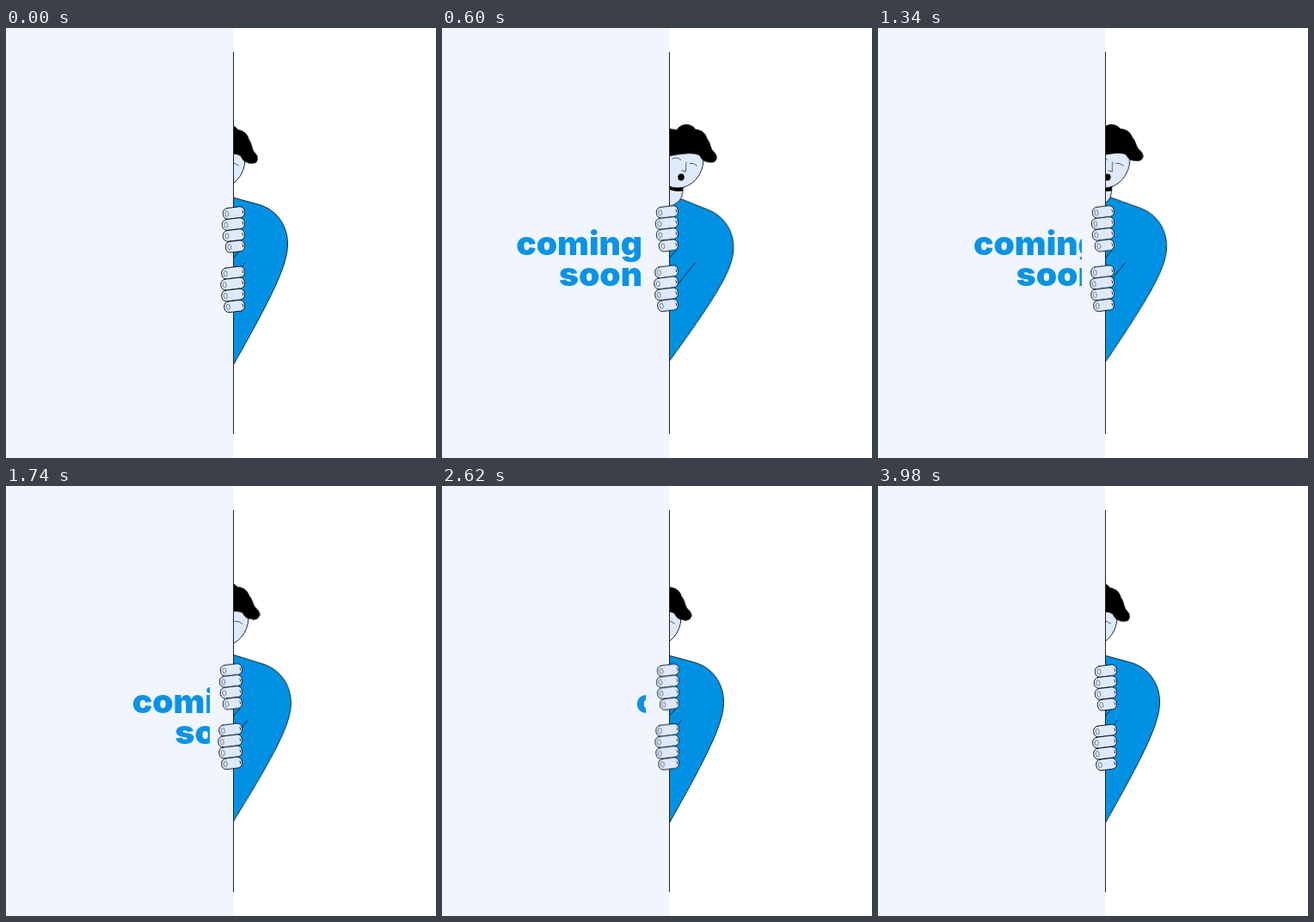
An HTML page that plays this animation: 500x500 px, repeating every 4000 ms.

```html
<!DOCTYPE html>
<html lang="en">
<head>
<meta charset="utf-8">
<title>Coming soon</title>
<style>
  html, body { margin: 0; width: 100%; height: 100%; overflow: hidden; background: #fff; }
  svg { display: block; width: 100vw; height: 100vh; }
  text { font: 900 39px Inter, "Open Sans", sans-serif; text-anchor: end; fill: #0a93e6; }
  .line, .skin, .shirt { stroke: #0b1016; stroke-width: .9; stroke-linecap: round; }
  .line { fill: none; }
  .fine { stroke-width: .65; }
  .skin { fill: #deeafc; }
  .shirt { fill: #0091e4; }
  .nail { fill: none; stroke: #4d586b; stroke-width: .7; }

  .torso, .peek, .hair, .hands, .words {
    animation: 4s cubic-bezier(.37, 0, .63, 1) infinite;
  }
  .torso { animation-name: lean; transform-origin: 245px 352px; }
  .peek { animation-name: peek; }
  .hair { animation-name: flop; transform-origin: 258px 134px; }
  .hands { animation-name: grip; }
  .words { animation-name: slide; }

  @keyframes lean {
    0%, 60%, 100% { transform: rotate(0deg); }
    17% { transform: rotate(6.8deg); }
  }
  /* --far is how far each part comes out from behind the wall */
  @keyframes peek {
    0% { transform: translateX(0); animation-timing-function: cubic-bezier(.3, 0, .4, 1); }
    17.25% { transform: translateX(var(--far)); }
    52.5%, 100% { transform: translateX(0); }
  }
  @keyframes flop {
    0%, 8%, 100% { transform: translateX(0) rotate(6deg); }
    24% { transform: translateX(0) rotate(0deg); }
    55% { transform: translateX(-4.5px) rotate(1.5deg); }
    80% { transform: translateX(-2px) rotate(6deg); }
  }
  @keyframes grip {
    0%, 81%, 100% { transform: translate(0, 0); }
    14%, 54% { transform: translate(-3px, -1.2px); }
  }
  @keyframes slide {
    0%, 5% { transform: translateX(152px); animation-timing-function: cubic-bezier(.5, 0, .2, 1); }
    16.75% { transform: translateX(-6px); }
    78.5%, 100% { transform: translateX(152px); }
  }
</style>
</head>
<body>
<svg viewBox="0 0 500 500">
  <defs>
    <clipPath id="open"><rect x="264.5" width="236" height="500"/></clipPath>
    <clipPath id="slot"><rect width="237" height="500"/></clipPath>
  </defs>
  <rect width="264.5" height="500" fill="#f0f5ff"/>

  <g clip-path="url(#open)">
    <path class="torso shirt" d="M236 189.500L293 205C314 210.500 327.500 229 327.500 251C327.500 274 313 306 264 392.500L236 442Z"/>
    <path class="line" d="M262 270L272 259"/>
    <path class="line peek" style="--far: 16.5px" d="M258 298L278 273"/>
    <g class="peek" style="--far: 19.8px">
      <path class="skin" d="M222 180L261 182Q261 191 259 197Q255 204 246 207.500L222 214Z"/>
      <path d="M222 180H261L260.500 189.500Q251 191 244 187.500L222 186Z"/>
    </g>
    <g class="peek" style="--far: 26.4px">
      <ellipse class="skin" cx="248" cy="153" rx="30" ry="33"/>
      <path class="line fine" d="M242 152Q247 149 252 153.500M262 157.500Q266 156 270.500 160M258 156Q257.500 162 257.500 167L253 165.800"/>
      <ellipse cx="252" cy="173.500" rx="3.700" ry="4"/>
      <path class="hair" d="M236 118L246 119C251 110 262 110 268 117C276 117 281 123 282 127C287 132 286 138 291 142C298 148 294 156 286 154.500C280 154.500 277 152 274 147C264 144 254 147 236 151Z"/>
    </g>
  </g>

  <path d="M264.500 28V472" stroke="#222"/>
  <g id="hands" class="hands"></g>

  <g clip-path="url(#slot)">
    <g class="words">
      <text x="237" y="264">coming</text>
      <text x="237" y="300">soon</text>
    </g>
  </g>
</svg>
<script>
const RIGHT = 277.5;

function finger(left, y) {
  return `<g transform="rotate(-7 ${(left + RIGHT) / 2} ${y})">
    <rect class="skin" x="${left}" y="${y - 6.4}" width="${RIGHT - left}" height="12.8" rx="5.5"/>
    <ellipse class="nail" cx="${left + 4.5}" cy="${y}" rx="2" ry="3.2"/>
    <path class="line" d="M${RIGHT - 2.5} ${y - 1.5}q1.5 1 .5 3"/></g>`;
}

// Four stacked fingers; the second reaches furthest.
function hand(x, y) {
  return [0, 1, 2, 3].map(i => finger(x + (i - 1) ** 2, y + 13 * i)).join('');
}

document.getElementById('hands').innerHTML = hand(251.3, 215) + hand(249.7, 284.5);
</script>
</body>
</html>
```
